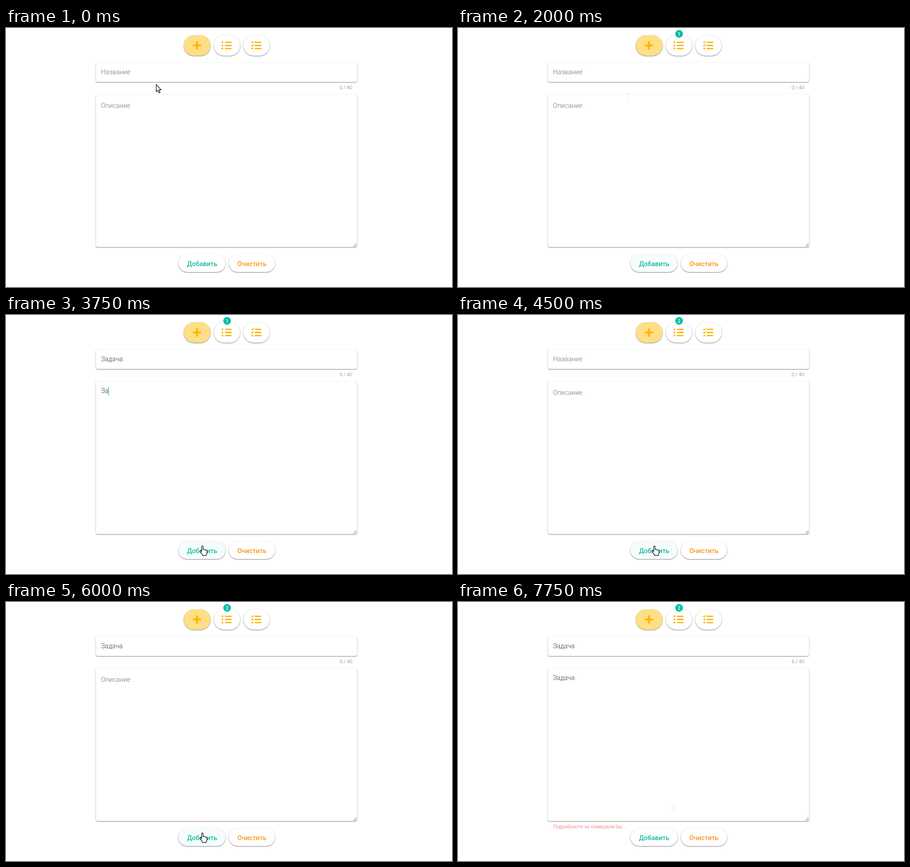
These frames come from a looping animation (981x571 px, 8 s). An HTML page:

```html
<!DOCTYPE html>
<html lang="ru">
<head>
<meta charset="utf-8">
<style>
  html, body { margin: 0; width: 981px; height: 571px; overflow: hidden; background: #fff; }
  .card {
    position: absolute; border-radius: 4px; background: #fff;
    box-shadow: 0 0 1px rgba(0,0,0,.12), 0 1px 3px rgba(0,0,0,.12), 0 1px 2px rgba(0,0,0,.4);
  }
  .pill { border-radius: 23px; }
  svg { position: absolute; left: 0; top: 0; }
  text { font: 300 14.4px Roboto, sans-serif; fill: #3c3c3c; }
  .label { fill: #757575; }
  .small { font-size: 10.8px; fill: #757575; }
  .error { fill: #ea5a57; }
  .button { font-weight: 500; text-anchor: middle; }
  .icon { fill: none; stroke: #ffb300; stroke-width: 2.8; }
  .round { stroke-linecap: round; stroke-linejoin: round; stroke-width: 4.2; }
</style>
</head>
<body>
<div class="card pill" style="left:391px;top:16px;width:59px;height:45px;background:#ffdf85"></div>
<div class="card pill" style="left:457px;top:16px;width:58px;height:45px"></div>
<div class="card pill" style="left:522px;top:16px;width:58px;height:45px"></div>
<div class="card" style="left:198px;top:76px;width:574px;height:43px"></div>
<div class="card" style="left:198px;top:146px;width:574px;height:337px"></div>
<div class="card pill" id="add" style="left:379px;top:499px;width:104px;height:39px"></div>
<div class="card pill" style="left:490px;top:499px;width:102px;height:39px"></div>

<svg width="981" height="571">
  <path class="icon round" d="M412.6 38.5h15M420.1 31v15"/>
  <path class="icon" d="M481.6 31.6h14.6M481.6 38.5h14.6M481.6 45.4h14.6M547 31.6h14.3M547 38.5h14.3M547 45.4h14.3"/>
  <path class="icon round" d="M476.1 31.6h0M476.1 38.5h0M476.1 45.4h0M541.8 45.4h0"/>
  <path class="icon round" style="stroke-width:1.8" d="M539.9 31.4l1.7 1.7 3.2-3.6M539.9 38.3l1.7 1.7 3.2-3.6"/>
  <path d="M764 482l7-7M768 482l3-3" stroke="#555"/>

  <g id="badge">
    <circle cx="486.3" cy="13" r="8.4" fill="#00bfa5"/>
    <text id="count" x="486.3" y="16.6" class="button" style="font-size:10.4px;fill:#fff"></text>
  </g>

  <text id="titleLabel" class="label" y="102">Название</text>
  <text id="title" x="209" y="102"></text>
  <text id="titleError" class="small error" x="209" y="135">А как же название?</text>
  <text id="counter" class="small" x="761.5" y="135" text-anchor="end"></text>

  <text id="noteLabel" class="label" y="176">Описание</text>
  <text id="note" x="209" y="172"></text>
  <text id="noteError" class="small error" x="209" y="499">Подробности не помешали бы...</text>

  <text class="button" x="431.5" y="524.5" style="fill:#14bb9f">Добавить</text>
  <text class="button" x="541" y="524.5" style="fill:#f9981c">Очистить</text>

  <rect id="caret" width="1.2" height="18" fill="#00bfa5"/>
  <g id="cursor">
    <path id="arrow" d="M.5-.5V15.5l3.5-3.2 2.4 5.7 2.5-1.1-2.4-5.6h4.6z" fill="#fff" stroke="#000" stroke-width="1.2"/>
    <path id="beam" d="M-3.5-7.5h2.5l1 1 1-1h2.5M0-6.5v13M-3.5 7.5h2.5l1-1 1 1h2.5" fill="none" stroke="#e4e8e8"/>
    <path id="hand" d="M-1.5 1q0-1.8 1.5-1.8T1.5 1v6q2.6-.8 3 .7 2.6-.7 3 .8 2.6-.4 2.6 1.6v4q0 2-1.6 4v2H0v-2l-4.7-6q-1.5-2 0-2.6 1.2-.4 3.2 2z" fill="#fff" stroke="#000" stroke-width="1.2" stroke-linejoin="round"/>
  </g>
</svg>

<script>
const LOOP = 8000, STEP = 250, WORD = 'Задача', LEFT = 209, LETTER_MS = 80, LABEL_MS = 300;
const el = id => document.getElementById(id);
const clamp = v => Math.max(0, Math.min(1, v));
const show = (id, opacity) => el(id).setAttribute('opacity', Number(opacity));

// Typing starts in title and note, pointer reaches the button, clicks, form is sent
const rounds = [
  { title: 350, note: 1050, reach: 1500, clicks: [1750], sent: 1750 },
  { title: 2400, note: 3550, reach: 3750, clicks: [4250, 4700], sent: 4250 },
  { title: 5250, note: 7050, reach: 6000, clicks: [6300], sent: Infinity }
];
const clicks = rounds.flatMap(r => r.clicks);
const [, titleFail, noteFail] = clicks.slice(1).length ? [0, clicks[2], clicks[3]] : [];

const places = { title: [364, 92], add: [432, 510], note: [383, 280], rest: [474, 454] };
const moves = [];
let free = 0;
for (const r of rounds) {
  moves.push({ from: free, to: r.title, place: places.title, power: 4 });
  moves.push({ from: r.title + 400, to: r.reach, place: places.add, power: 2 });
  free = r.clicks.at(-1);
}
moves.push({ from: free, to: free + 600, place: places.note, power: 4 });
moves.push({ from: free + 700, to: LOOP - STEP, place: places.rest, power: 2 });

function pointerAt(t) {
  return moves.reduce((pos, { from, to, place, power }) => {
    const eased = 1 - (1 - clamp((t - from) / (to - from))) ** power;
    return pos.map((v, i) => v + (place[i] - v) * eased);
  }, [330, 125]);
}

function drawField(name, round, t) {
  const since = t - round[name];
  const letters = Math.floor(clamp(since / (LETTER_MS * WORD.length)) * WORD.length);
  const leave = clamp(since / LABEL_MS + 1);
  el(name).textContent = WORD.slice(0, letters);
  el(name + 'Label').setAttribute('x', LEFT - 10 * leave);
  show(name + 'Label', 1 - leave);
  return letters;
}

function drawCaret(round, t) {
  const inNote = t >= round.note - LABEL_MS && t < round.note + 600;
  const inTitle = t >= round.title && t < round.title + 700;
  const field = el(inNote ? 'note' : 'title');
  const width = field.textContent ? field.getComputedTextLength() : 0;
  show('caret', inTitle || inNote);
  el('caret').setAttribute('x', LEFT - .4 + width);
  el('caret').setAttribute('y', inNote ? 159 : 88);
}

function drawPointer(t) {
  const [x, y] = pointerAt(t);
  const hand = y >= 499, arrow = !hand && (y > 483 || (y > 119 && y < 146));
  el('cursor').setAttribute('transform', `translate(${x} ${y})`);
  show('hand', hand);
  show('arrow', arrow);
  show('beam', !hand && !arrow);
  const pressed = clicks.map(c => t < c ? 0 : clamp((260 - (t - c)) / 60));
  const tint = Math.max(hand ? .17 : 0, ...pressed);
  el('add').style.background = `rgba(0,191,165,${.22 * tint})`;
}

function draw(t) {
  const round = rounds.find(r => t < r.sent);
  const letters = drawField('title', round, t);
  drawField('note', round, t);
  const titleError = t >= titleFail && t < noteFail && !letters;
  el('counter').textContent = letters + ' / 40';
  el('counter').classList.toggle('error', titleError);
  show('titleError', titleError);
  show('noteError', clamp((t - noteFail) / 300));
  const added = rounds.indexOf(round);
  show('badge', added > 0);
  el('count').textContent = added;
  drawCaret(round, t);
  drawPointer(t);
}

const start = performance.now();
function tick() {
  const t = (performance.now() - start) % LOOP;
  draw(Math.floor(t / STEP) * STEP);
  requestAnimationFrame(tick);
}
tick();
</script>
</body>
</html>
```
